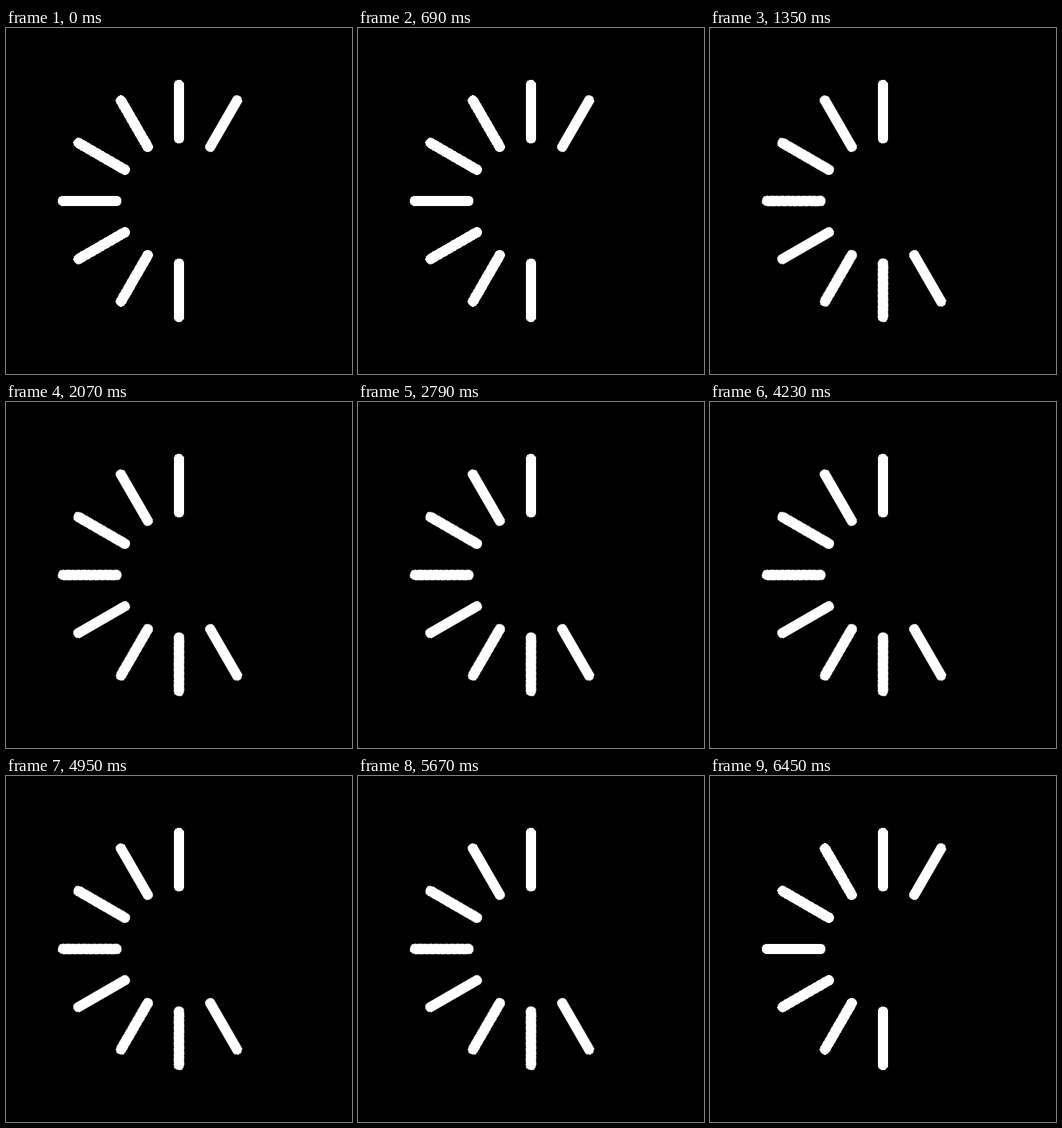
An HTML page that plays this animation: 480 px wide and 480 px high, repeating every 6.48 s.

```html
<!DOCTYPE html>
<html lang="en">
<head>
<meta charset="utf-8">
<title>Spinner</title>
<style>
  html, body { margin: 0; width: 100%; height: 100%; overflow: hidden; background: #000; }
  svg { display: block; width: 100%; height: 100%; }
  line { stroke: #fff; stroke-width: 14.4; stroke-linecap: round; shape-rendering: crispEdges; }
  #spokes { transform-origin: 0 0; }
</style>
</head>
<body>
<svg viewBox="0 0 480 480">
  <g transform="translate(240 240)"><g id="spokes"></g></g>
</svg>
<script>
  const SPOKES = 12, VISIBLE = 8, FIRST = 6;
  const STEP = 60;
  const LEAD = STEP / 2 + 0.5; // just over half a step, so exact boundaries round forward
  const INNER = 86.7, OUTER = 161;
  const group = document.getElementById('spokes');

  // Eight spokes run clockwise from six o'clock; the rest is the gap.
  for (let i = 0; i < VISIBLE; i++) {
    const line = document.createElementNS('http://www.w3.org/2000/svg', 'line');
    line.setAttribute('y1', -INNER);
    line.setAttribute('y2', -OUTER);
    line.setAttribute('transform', `rotate(${(FIRST + i) * 360 / SPOKES})`);
    group.append(line);
  }

  // One spoke clockwise per step; the first step is half length.
  group.animate(
    [{ transform: 'rotate(0deg)' }, { transform: 'rotate(360deg)' }],
    {
      duration: SPOKES * STEP,
      delay: -LEAD,
      iterations: Infinity,
      easing: `steps(${SPOKES}, end)`
    }
  );
</script>
</body>
</html>
```
